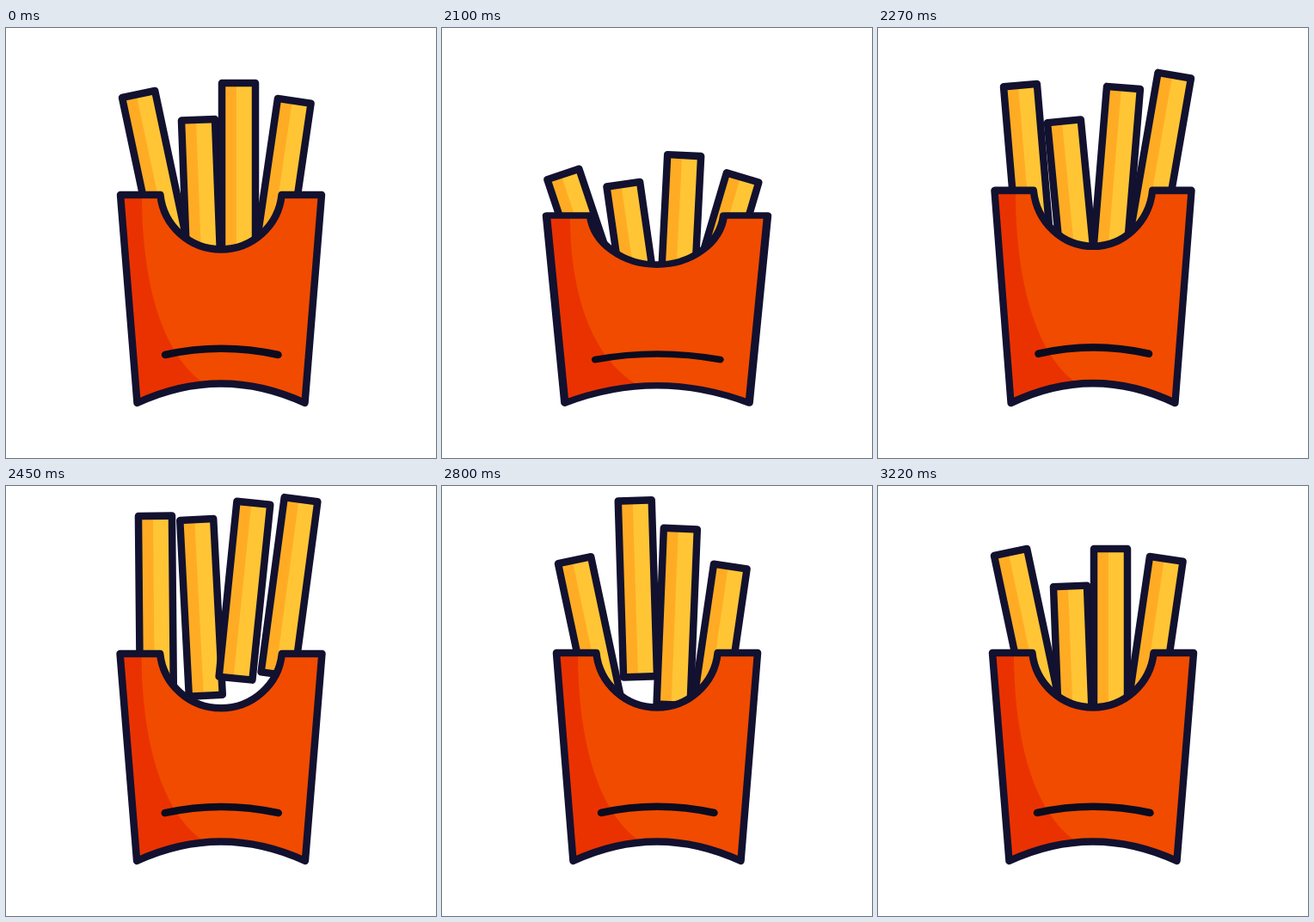
An HTML page for the animation above (3250 ms loop, 500 px wide and 500 px high).

```html
<!DOCTYPE html>
<html lang="en">
<head>
<meta charset="utf-8">
<title>Jumping fries</title>
<style>
  html, body { margin: 0; height: 100%; overflow: hidden; background: #fff; }
  svg { display: block; width: 100vw; height: 100vh; }
  .line { fill: none; stroke: #12112f; stroke-width: 8.5; stroke-linejoin: round; stroke-linecap: round; }
</style>
</head>
<body>
<svg viewBox="0 0 500 500">
  <defs>
    <g id="fry" transform="translate(-19.5 -102.5)">
      <path fill="#ffc535" d="M0 0H39V205H0Z"/>
      <path fill="#ffac24" d="M0 0H17V205H0Z"/>
      <path class="line" d="M0 0H39V205H0Z"/>
    </g>
    <path id="shell" d="M133 194H179.4A71 71 0 0 0 320.6 194H367L347.500 436Q250 391 152.500 436Z"/>
  </defs>
  <g id="fries"></g>
  <g id="box">
    <use href="#shell" fill="#f14b00"/>
    <path fill="#ea3200" d="M133 194H158C158 290 179 377 230 413Q190 418 152.500 436Z"/>
    <use href="#shell" class="line"/>
    <path class="line" style="stroke:#0b0b1e" d="M185 380Q250 365.500 316.500 380"/>
  </g>
</svg>
<script>
const LOOP = 3250, START = 2020, CROUCH = 1992, LEAP = 2100, FALL = 320, BOUNCE = 220;

// rest: centre x, centre y, angle; crouch and top: offsets from rest
// peak: time of the highest point; sink: how much lower the fry lands
const FRIES = [
  { rest: [175.4, 177.2, -12], crouch: [-2, 90, -6.5], top: [-1, -40, 11.5], peak: 2435, sink: 0 },
  { rest: [227.4, 209.2, -2.2], crouch: [-2, 74, -6], top: [0, -102, 0.5], peak: 2695, sink: 9 },
  { rest: [270.5, 166.5, 0], crouch: [6, 84, 2.9], top: [7, -52, 6], peak: 2550, sink: 9 },
  { rest: [320.5, 186.2, 8.3], crouch: [0, 86, 8.2], top: [9, -69, -0.7], peak: 2440, sink: 0 }
];

const clamp = u => Math.min(1, Math.max(0, u));
const progress = (t, from, to) => clamp((t - from) / (to - from));
const smooth = u => u * u * (3 - 2 * u);
const easeOut = u => 1 - (1 - u) ** 2;
const mix = (a, b, u) => a.map((v, i) => v + (b[i] - v) * u);

// Crouch, rise against gravity, fall, then dip once on landing
function offset({ crouch, top, peak, sink }, t) {
  const takeoff = LEAP + 0.15 * (peak - 2420), land = peak + FALL;
  if (t < takeoff) return mix([0, 0, 0], crouch, smooth(progress(t, CROUCH, LEAP)));
  if (t < peak) return mix(crouch, top, easeOut(progress(t, takeoff, peak)));
  if (t < land) return mix(top, [0, sink, 0], progress(t, peak, land) ** 2);
  const since = Math.min(t - land, BOUNCE);
  return [0, sink + 24 * Math.sin(Math.PI * since / BOUNCE) * Math.exp(-since / 100), 0];
}

// Vertical scale of the box: squash, then a damped spring
function boxScale(t) {
  if (t < LEAP) return 1 - 0.1 * smooth(progress(t, CROUCH, LEAP));
  const since = t - LEAP;
  return 1 - 0.1 * Math.cos(2 * Math.PI * since / 340) * Math.exp(-since / 109);
}

const box = document.getElementById('box');
const group = document.getElementById('fries');
const sticks = FRIES.map(() => {
  const use = document.createElementNS('http://www.w3.org/2000/svg', 'use');
  use.setAttribute('href', '#fry');
  return group.appendChild(use);
});

function draw(now) {
  let t = now % LOOP;
  if (t < START) t = 0;
  FRIES.forEach((fry, i) => {
    const move = offset(fry, t);
    const [x, y, angle] = fry.rest.map((v, k) => v + move[k]);
    sticks[i].setAttribute('transform', `translate(${x} ${y}) rotate(${angle})`);
  });
  const s = boxScale(t);
  box.setAttribute('transform', `translate(250 436) scale(${2 - s} ${s}) translate(-250 -436)`);
}

const begin = performance.now();
function tick() {
  draw(performance.now() - begin);
  requestAnimationFrame(tick);
}
tick();
</script>
</body>
</html>
```
